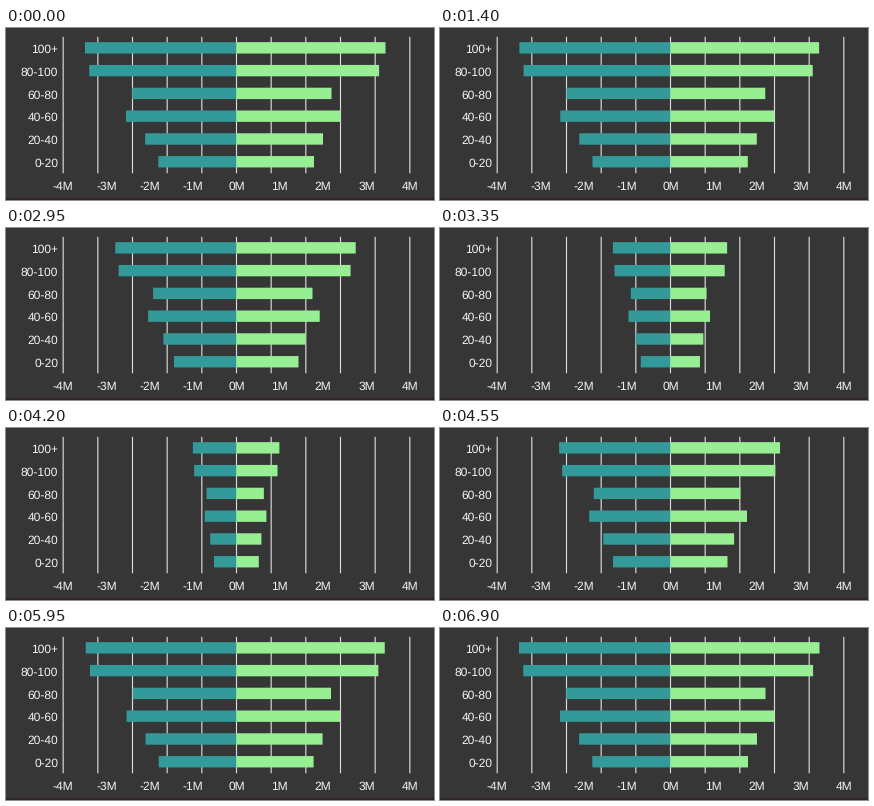
Recreate the animation shown at these times as a matplotlib script. Size 428 px wide and 172 px high, loop 8.05 s.

```python
import matplotlib.pyplot as plt
from matplotlib.animation import FuncAnimation
from matplotlib.patches import Rectangle

plt.rcParams["text.hinting"] = "none"

W, H, DPI = 428, 172, 64
PX = 72 / DPI  # points per pixel
STEP, LOOP = 50, 8050

ZERO = 230.5
GRID_STEP, TICK_STEP = 104 / 3, 130 / 3
BAR_TOP, BAR_PITCH = 14.15, 22.78
BAR_HEIGHT = BAR_PITCH / 2
DURATION, SHRINK_START, GROW_START = 2450, 1069, 4080

BACKGROUND, TEAL, GREEN = "#373637", "#339999", "#98ee92"
GROUPS = ["100+", "80-100", "60-80", "40-60", "20-40", "0-20"]
LEFT = [151.5, 147.3, 104.3, 110.5, 91.4, 78.2]
RIGHT = [149.0, 142.6, 95.0, 104.0, 86.5, 77.5]

fig = plt.figure(figsize=(W / DPI, H / DPI), dpi=DPI, facecolor=BACKGROUND)
ax = fig.add_axes([0, 0, 1, 1])
ax.set_xlim(0, W)
ax.set_ylim(H, 0)
ax.axis("off")


def label(x, y, text, align):
    ax.text(x, y, text, ha=align, va="baseline", color="#f2f2f2",
            family="Liberation Sans", size=12 * PX)


def add_bar(row, color):
    bar = Rectangle((ZERO, BAR_TOP + row * BAR_PITCH), 0, BAR_HEIGHT,
                    facecolor=color, linewidth=0, snap=False, zorder=3)
    return ax.add_patch(bar)


def ease_out_expo(u):
    if u <= 0:
        return 0.0
    return 1.0 if u >= 1 else 1 - 2 ** (-10 * u)


def bar_scale(ms):
    if ms < (SHRINK_START + DURATION + GROW_START) / 2:
        return ease_out_expo(1 - (ms - SHRINK_START) / DURATION)
    return ease_out_expo((ms - GROW_START) / DURATION)


for k in range(-5, 6):
    x = ZERO + k * GRID_STEP
    ax.plot([x, x], [8.8, 145.2], color="#dcdcdc", lw=1.15 * PX,
            solid_capstyle="butt", snap=False, zorder=1)

for k in range(-4, 5):
    label(ZERO + k * TICK_STEP, 162, f"{k}M", "center")

for row, group in enumerate(GROUPS):
    label(52.2, 25 + row * BAR_PITCH, group, "right")

ax.add_patch(Rectangle((0, 170), W, 2, facecolor="#2e2528", linewidth=0))

left_bars = [add_bar(row, TEAL) for row in range(len(GROUPS))]
right_bars = [add_bar(row, GREEN) for row in range(len(GROUPS))]


def update(frame):
    scale = bar_scale(frame * STEP)
    for bar, length in zip(left_bars, LEFT):
        bar.set_x(ZERO - length * scale)
        bar.set_width(length * scale)
    for bar, length in zip(right_bars, RIGHT):
        bar.set_width(length * scale)
    return left_bars + right_bars


anim = FuncAnimation(fig, update, frames=LOOP // STEP, interval=STEP,
                     repeat=True, repeat_delay=0, blit=False)
plt.show()
```
